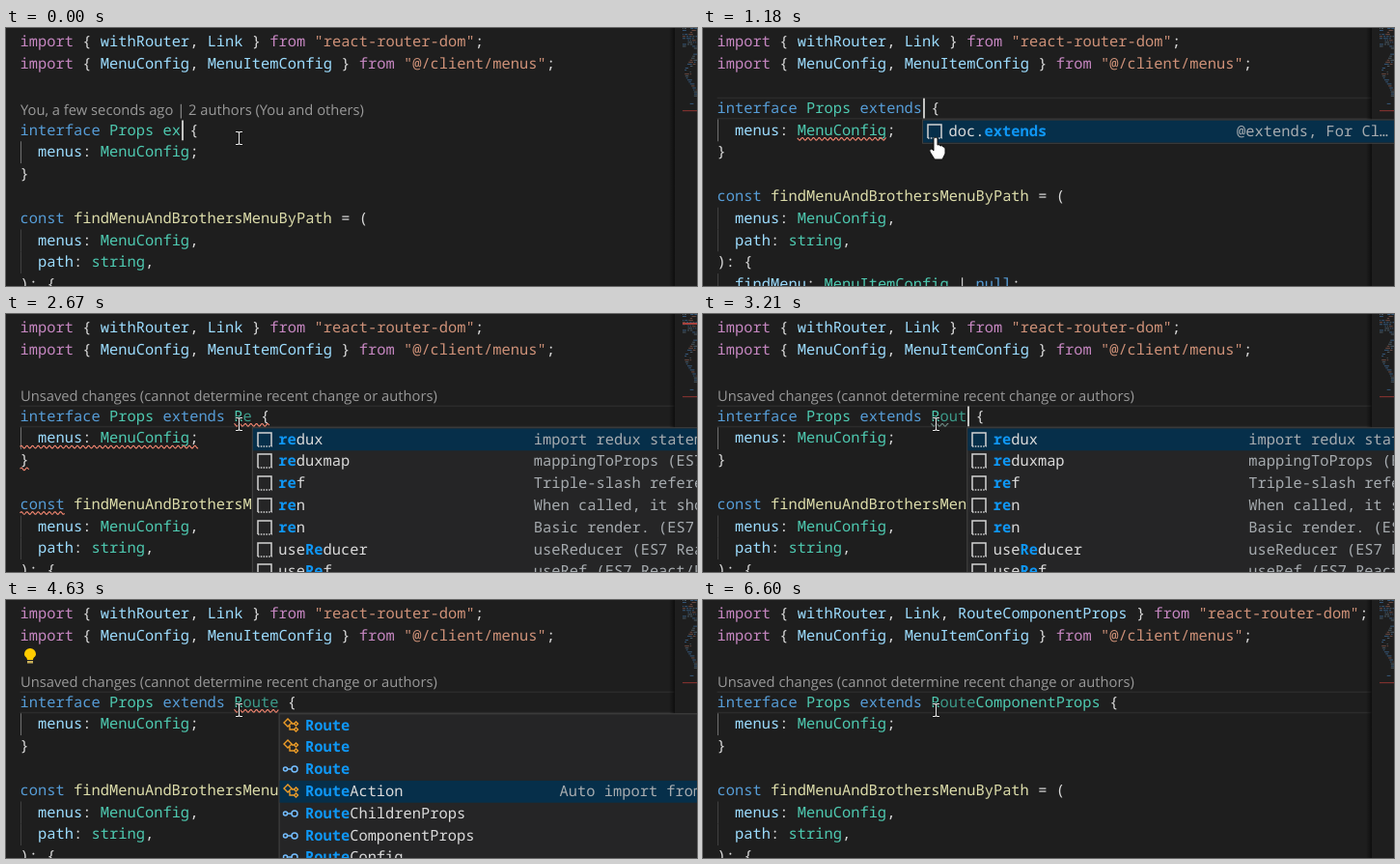
An HTML page with a canvas for the animation above (6.69 s loop, 716x267 px).

```html
<!DOCTYPE html>
<html lang="en">
<head>
<meta charset="utf-8">
<title>Auto import while typing</title>
<style>
html, body { margin: 0; width: 100%; height: 100%; overflow: hidden; background: #1e1e1e; }
canvas { display: block; }
</style>
</head>
<body>
<canvas id="stage" width="716" height="267"></canvas>
<script>
const ctx = document.getElementById('stage').getContext('2d');
const LOOP = 6690, LEFT = 14.6, CHAR = 9.24, TOP = 3.3, ROW = 22.8, BASE = 16.1;
const MONO = '15.4px "Noto Sans Mono", monospace';
const BLUE = '#569cd6', PURPLE = '#c586c0', TEAL = '#4ec9b0', DIM_TEAL = '#3c9a89';
const VAR = '#9cdcfe', PUNCT = '#dadada', STRING = '#ce9178', ERROR = '#f48771', FAINT = '#6f8a84';

const WORDS = { import: PURPLE, from: PURPLE, interface: BLUE, extends: BLUE, const: BLUE, null: BLUE,
  string: TEAL, findMenuAndBrothersMenuByPath: '#dcdcaa' };
const BODY = ['  menus: MenuConfig;', '}', '', 'const findMenuAndBrothersMenuByPath = (',
  '  menus: MenuConfig,', '  path: string,', '): {', '  findMenu: MenuItemConfig | null;'];

// Completion lists: icon, label, matched part, detail, detail when picked
const DOC = { at: 326, items: [['snippet', 'doc.extends', 'extends', '@extends, For Cl…']] };
const SNIPPETS = { at: 292, items: [
  ['redux', 're', 'import redux statement'], ['reduxmap', 're', 'mappingToProps (ES7 React)'],
  ['ref', 're', 'Triple-slash reference'], ['ren', 're', 'When called, it should'],
  ['ren', 're', 'Basic render. (ES7 React)'], ['useReducer', 'Re', 'useReducer (ES7 React)'],
  ['useRef', 'Re', 'useRef (ES7 React/Redux)']].map(item => ['snippet', ...item]) };
const ROUTES = { at: 291, items: [['class', ''], ['class', ''], ['type', ''], ['class', 'Action'],
  ['type', 'ChildrenProps'], ['type', 'ComponentProps'], ['type', 'Config']]
  .map(([icon, tail], i) => [icon, 'Route' + tail, 'Route', '', i > 2 && 'Auto import from']) };

// Squiggles: line below the interface, first and last column, colour
const ROUTE_WAVE = [[0, 24, 29, ERROR]];
const FAINT_WAVE = [[0, 24, 26, FAINT]];
const TAIL_WAVES = [[1, 0, 20, ERROR], [4, 0, 5, ERROR]];
const ALL_WAVES = [[0, 24, 28, ERROR], [2, 0, 1, ERROR], ...TAIL_WAVES];

// Each step changes only the listed parts of the state
const STEPS = [
  [0, { word: 'ex', lens: 'You, a few seconds ago | 2 authors (You and others)', caret: true, waves: [],
        list: null, pick: 0, hand: false, bulb: false, line: false, done: false, hot: false }],
  [550, { word: 'exten', lens: '' }],
  [960, { word: 'extend', line: true }],
  [1030, { list: DOC, hand: true }],
  [1180, { word: 'extends', waves: [[1, 9, 19, ERROR]] }],
  [1430, { word: 'extends ', lens: 'You, a few seconds ago | 2 authors (You and others)', list: null,
           hand: false, waves: TAIL_WAVES }],
  [1580, { word: 'extends Re', lens: 'Unsaved changes (cannot determine recent change or authors)',
           waves: ALL_WAVES, hot: true }],
  [2670, { list: SNIPPETS, caret: false }],
  [2900, { word: 'extends R', caret: true, waves: [], hot: false }],
  [3060, { word: 'extends Rou', waves: FAINT_WAVE }],
  [3210, { word: 'extends Rout' }],
  [3300, { word: 'extends Route' }],
  [3450, { list: ROUTES, waves: ROUTE_WAVE }],
  [4330, { pick: 1 }],
  [4480, { pick: 2 }],
  [4630, { pick: 3, bulb: true, caret: false }],
  [4880, { pick: 4 }],
  [5110, { pick: 5 }],
  [6040, { word: 'extends RouteComponentProps', list: null, bulb: false, done: true, caret: true }],
  [6600, { waves: [], caret: false }],
];

const colX = col => LEFT + col * CHAR;
const rowY = row => TOP + row * ROW;

function text(str, x, y, color, font = MONO) {
  ctx.font = font;
  ctx.fillStyle = color;
  ctx.fillText(str, x, Math.round(y));
}

function box(x, y, w, h, color) {
  ctx.fillStyle = color;
  ctx.fillRect(x, y, w, h);
}

function stroke(d, color, width = 1) {
  ctx.strokeStyle = color;
  ctx.lineWidth = width;
  ctx.stroke(new Path2D(d));
}

function wordColor(word, code) {
  if (WORDS[word]) return WORDS[word];
  if (word[0] === '"') return STRING;
  if (!/\w/.test(word)) return PUNCT;
  if (code.startsWith('interface')) return TEAL;
  return !code.startsWith('import') && /^Menu/.test(word) ? TEAL : VAR;
}

function codeLine(code, row) {
  for (const { 0: word, index } of code.matchAll(/"[^"]*"|\w+|[^\w"\s]+/g)) {
    text(word, colX(index), rowY(row) + BASE, wordColor(word, code));
  }
}

function squiggle(row, from, to, color) {
  const y = rowY(row) + 20.3, end = colX(to);
  ctx.beginPath();
  for (let x = colX(from); x <= end; x += 0.5) ctx.lineTo(x, y + 1.3 * Math.sin(x * Math.PI / 2.9));
  ctx.strokeStyle = color;
  ctx.lineWidth = 1.1;
  ctx.stroke();
}

function minimap(hot) {
  const shade = ctx.createLinearGradient(687, 0, 693, 0);
  shade.addColorStop(0, '#0000');
  shade.addColorStop(1, '#0008');
  box(687, 0, 6, 267, shade);
  let seed = 7;
  const random = () => (seed = seed * 16807 % 2147483647) / 2147483647;
  for (let i = 0; i < 40; i++) {
    const dense = i < 10;
    const start = dense ? 701 : 703 + 5 * (1 - Math.cos(i / 3.5));
    const end = dense ? 716 : start + 2 + random() * 5;
    for (let x = start; x < end; ) {
      const w = 1 + random() * 4, kind = random();
      const color = kind < 0.2 ? '#6b4a42' : kind < 0.7 ? '#35587a' : '#4a5a64';
      if (random() < 0.75) box(x, i * 2.05, w, 1, color);
      x += w + 1;
    }
  }
  if (hot) box(701, 9, 15, 2, '#a8433f');
  box(701, 85, 15, 1.2, '#7c302d');
}

const diamond = (x, y, r) => `M${x - r} ${y}l${r} ${-r}l${r} ${r}l${-r} ${r}z`;
const ring = (x, y, r) => `M${x - r} ${y}a${r} ${r} 0 1 1 ${2 * r} 0a${r} ${r} 0 1 1 ${-2 * r} 0`;
const ICONS = {
  snippet() {
    stroke('M-7 7V-7H7V7', '#d4d4d4', 1.5);
    ctx.setLineDash([1.5, 1.3]);
    stroke('M-7 7H7.7', '#d4d4d4', 1.5);
    ctx.setLineDash([]);
  },
  class() {
    stroke(diamond(-3, -3, 4) + 'M1 -2H4M-1 0V4H4' + diamond(5.5, -2, 2) + diamond(5.5, 4, 2), '#ee9d28', 1.4);
  },
  type() {
    stroke(ring(-5.5, 0, 2) + 'M-3.5 0H1' + ring(4, 0, 3), '#75beff', 1.5);
  },
};

function popup({ at, items }, pick, x, y) {
  const height = items.length * ROW + 1.2;
  box(x, y, 716, height + 1.2, '#454545');
  box(x + 1, y + 1, 716, height - 0.6, '#252526');
  items.forEach(([icon, label, match, detail, pickedDetail], i) => {
    const top = y + 1.2 + i * ROW, base = top + BASE, start = label.indexOf(match);
    const labelX = x + 27.4, picked = i === pick;
    if (picked) box(x + 1, top, 716, ROW, '#062f4a');
    ctx.save();
    ctx.translate(Math.round(x + 12.7), Math.round(top + 11));
    ICONS[icon]();
    ctx.restore();
    text(label.slice(0, start), labelX, base, PUNCT);
    text(match, labelX + start * CHAR, base, '#0f97f5', 'bold ' + MONO);
    text(label.slice(start + match.length), labelX + (start + match.length) * CHAR, base, PUNCT);
    text(detail || (picked && pickedDetail) || '', x + at, base, '#a6abaf');
  });
}

function lightbulb() {
  ctx.fillStyle = '#ffcc00';
  ctx.fill(new Path2D('M22 62C22 59 19 59 19 56A6 6 0 0 1 31 56C31 59 28 59 28 62z'));
  box(22, 63, 6, 2.5, '#c9b05a');
}

function pointer(hand) {
  if (!hand) {
    const beam = 'M238 107.5H240.5L241.5 108.5L242.5 107.5H245M241.5 108V120M238 120.5H240.5L241.5 119.5L242.5 120.5H245';
    stroke(beam, '#111', 2.4);
    stroke(beam, '#e8e8e8', 1.1);
    return;
  }
  const palm = new Path2D('M239 114Q241 112 243 114V121Q245 120 246 122Q248 121 249 123Q251 123 251 125V130L248 136H240L235 128Q234 125 237 125L239 127z');
  ctx.fillStyle = '#fff';
  ctx.fill(palm);
  ctx.strokeStyle = '#111';
  ctx.lineWidth = 1;
  ctx.stroke(palm);
}

function draw(s) {
  const row = s.lens ? 4 : 3, y = rowY(row);
  const code = `interface Props ${s.word.trimEnd()}`;
  const caretCol = 16 + s.word.length;
  box(0, 0, 716, 267, '#1e1e1e');
  if (s.line) {
    box(LEFT, y, 678, 1.5, '#2b2b2b');
    box(LEFT, y + ROW - 1.5, 678, 1.5, '#2b2b2b');
  }
  minimap(s.hot);

  codeLine(`import { withRouter, Link${s.done ? ', RouteComponentProps' : ''} } from "react-router-dom";`, 0);
  codeLine('import { MenuConfig, MenuItemConfig } from "@/client/menus";', 1);
  if (s.lens) text(s.lens, 15, 90, '#999', '14.72px "Open Sans", sans-serif');
  codeLine(code, row);
  if (code.length > 25) {
    const shaded = code.slice(25, 29);
    box(colX(25), y + 3, shaded.length * CHAR, 16, '#1e1e1e');
    text(shaded, colX(25), y + BASE, DIM_TEAL);
  }
  text('{', colX(caretCol + 1), y + BASE, PUNCT);

  BODY.forEach((line, i) => {
    codeLine(line, row + 1 + i);
    if (line[0] === ' ') box(15, rowY(row + 1 + i), 1, ROW, i ? '#404040' : '#707070');
  });
  for (const [offset, from, to, color] of s.waves) squiggle(row + offset, from, to, color);
  if (s.list) popup(s.list, s.pick, colX(caretCol), y + ROW);
  if (s.caret) box(Math.round(colX(caretCol) + 0.6), y + 1, 2, ROW - 2, '#c4c4c2');
  if (s.bulb) lightbulb();
  pointer(s.hand);
}

function frame() {
  const time = performance.now() % LOOP;
  draw(Object.assign({}, ...STEPS.filter(([start]) => start <= time).map(([, change]) => change)));
  requestAnimationFrame(frame);
}

ctx.textRendering = 'geometricPrecision';
frame();
</script>
</body>
</html>
```
